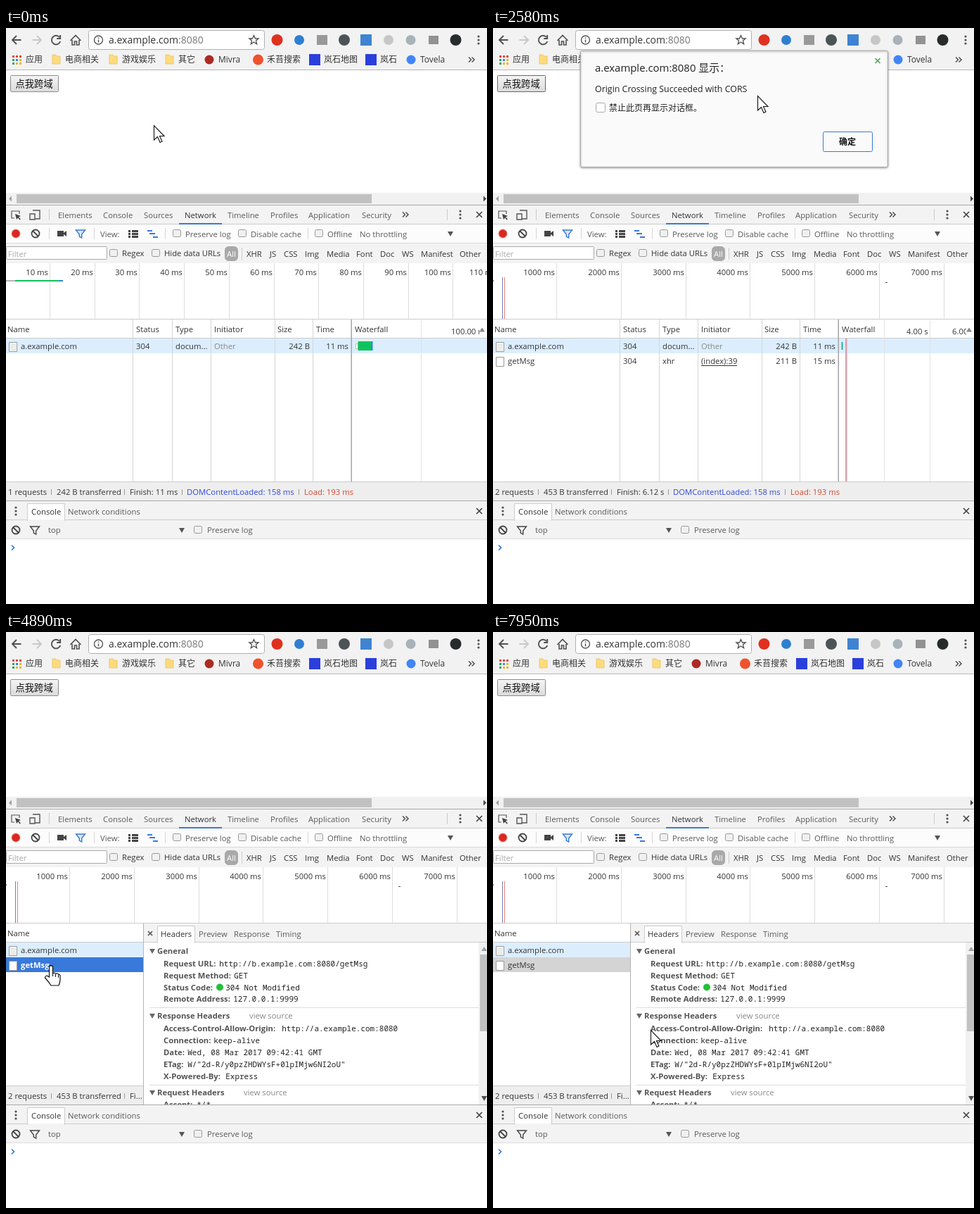
An HTML page with a canvas for the animation above (8000 ms loop, 684x818 px).

```html
<!DOCTYPE html>
<html lang="zh">
<head>
<meta charset="utf-8">
<style>
html, body { margin: 0; width: 100%; height: 100%; overflow: hidden; background: #fff; }
canvas { display: block; }
</style>
</head>
<body>
<canvas id="stage" width="684" height="818"></canvas>
<script>
const g = document.getElementById('stage').getContext('2d');
const LOOP = 8000;
const SANS = '"Open Sans","Noto Sans CJK SC","Noto Sans CJK JP",sans-serif';
const MONO = '"Noto Sans Mono","DejaVu Sans Mono",monospace';
const INK = '#333', SOFT = '#5a5a5a', DIM = '#888', BLUE = '#3879d9', BAR = '#f3f3f3', EDGE = '#ccc';

// Moments at which the page changes, in ms
const AT = { hover: 900, pending: 1140, alert: 1280, done: 1340, closed: 3200,
  rowHover: 4000, detail: 4450, arrow: 5210, drag: 5850, clear: 7180 };

// Pointer path: time, x, y
const POINTER = [
  [0, 210, 138], [230, 210, 138], [970, 44, 80], [1590, 44, 80], [2400, 344, 96], [2580, 376, 96],
  [2680, 376, 96], [3020, 523, 169], [3500, 523, 169], [3760, 96, 414], [4140, 46, 477],
  [4830, 46, 477], [4890, 63, 474], [5020, 172, 470], [5160, 172, 470], [5530, 225, 468],
  [5790, 225, 468], [5970, 313, 467], [6610, 505, 472], [6680, 508, 472], [6750, 516, 472],
  [7200, 516, 472], [7750, 236, 576], [7950, 224, 565], [8000, 224, 565]];

function rect(x, y, w, h, color) {
  g.fillStyle = color;
  g.fillRect(x, y, w, h);
}
function frame(x, y, w, h, fill, edge, r = 0) {
  g.beginPath();
  g.roundRect(x + .5, y + .5, w - 1, h - 1, r);
  g.fillStyle = fill;
  g.fill();
  g.lineWidth = 1;
  g.strokeStyle = edge;
  g.stroke();
}
function dot(x, y, r, color) {
  g.beginPath();
  g.arc(x, y, r, 0, 7);
  g.fillStyle = color;
  g.fill();
}
function shape(d, x, y, stroke, width = 1.5, fill) {
  const p = new Path2D(d);
  g.save();
  g.translate(x, y);
  if (fill) { g.fillStyle = fill; g.fill(p); }
  if (stroke) { g.strokeStyle = stroke; g.lineWidth = width; g.stroke(p); }
  g.restore();
}
function text(s, x, y, color = INK, { size = 11.3, bold, mono, align = 'left' } = {}) {
  g.font = (bold ? 'bold ' : '') + size + 'px ' + (mono ? MONO : SANS);
  g.textAlign = align;
  g.fillStyle = color;
  g.fillText(s, x, y);
}
function clipped(x, y, w, h, draw) {
  g.save();
  g.beginPath();
  g.rect(x, y, w, h);
  g.clip();
  draw();
  g.restore();
}
// Flat list of label, x pairs on one baseline
function labels(list, y, color, style) {
  for (let i = 0; i < list.length; i += 2) text(list[i], list[i + 1], y, color, style);
}
const right = (s, x, y, color) => text(s, x, y, color, { align: 'right' });
const vline = (x, y, h, color = '#ddd') => rect(x, y, 1, h, color);
const check = (x, y) => frame(x - 6, y - 6, 12, 11, '#f0f0f0', '#999', 2);
const cross = (x, y, c = '#444', r = 4) => shape(`M${-r} ${-r}L${r} ${r}M${r} ${-r}L${-r} ${r}`, x, y, c, 1.7);
const dots = (x, y) => [-5, 0, 5].forEach(d => dot(x, y + d, 1.6, '#505050'));
const down = (x, y, c = '#555') => shape('M-4-3H4L0 4Z', x, y, null, 0, c);
const up = (x, y, c) => shape('M-4 3H4L0-3Z', x, y, null, 0, c);
const more = (x, y) => shape('M-4-3.5L-.5 0-4 3.5M.5-3.5L4 0 .5 3.5', x, y, '#444', 1.4);
const funnel = (x, y, c, fill) => shape('M-6.5-5H6.5L1.7 1V6L-1.7 4V1Z', x, y, c, 1.4, fill);
const block = (x, y) => shape('M5.5 0A5.5 5.5 0 1 1-5.5 0 5.5 5.5 0 1 1 5.5 0M-4-4L4 4', x, y, '#444', 1.8);
const fileIcon = (y, lined) => {
  frame(4, y, 12, 14, '#fff', '#999');
  if (lined) for (let i = 3; i < 12; i += 2) rect(6, y + i, 8, 1, '#d5dbd5');
};

function browserBar() {
  rect(0, 0, 684, 59, '#f2f2f2');
  rect(0, 59, 684, 1, '#b8b8b8');
  const arrow = 'M6.5 0H-6M0-6L-6 0 0 6';
  shape(arrow, 15, 17, '#505050', 1.9);
  g.save();
  g.scale(-1, 1);
  shape(arrow, -44, 17, '#c8c8c8', 1.9);
  g.restore();
  shape('M5-4A6.3 6.3 0 1 0 6.2 2M6.2-7V-2H1.2', 71, 17, '#505050', 1.9);
  shape('M-7.5 1L0-6.5 7.5 1M-5 0V7H-1.5V2H1.5V7H5V0', 99, 17, '#505050', 1.6);
  frame(117, 3, 251, 28, '#fff', '#b0b0b0', 3);
  shape('M6 0A6 6 0 1 1-6 0 6 6 0 1 1 6 0M0-3.5V-2M0-.5V3.5', 131.5, 17, '#555', 1.4);
  text('a.example.com', 146, 22, INK, { size: 14 });
  text(':8080', 245, 22, '#777', { size: 14 });
  shape('M0-6.5L2-2 6.6-2 3 1 4.2 5.8 0 3-4.2 5.8-3 1-6.6-2-2-2Z', 352.5, 17, '#505050', 1.3);
  dot(385.5, 17, 8, '#e0301e');
  dot(417, 17, 7, '#2f7fd0');
  rect(442, 10, 15, 14, '#999');
  dot(481, 17, 8, '#4c5357');
  rect(504, 9, 16, 16, '#3f83d2');
  dot(544, 17, 7, '#c6c6c6');
  dot(575.5, 17, 7, '#a8b3b8');
  rect(601, 11, 14, 12, '#929292');
  dot(639.5, 17, 8, '#272b2b');
  dots(672, 17);

  const tiles = ['#e0483b', '#e0483b', '#e0483b', '#36a160', '#4285e4', '#eab52b', '#36a160', '#eab52b', '#eab52b'];
  tiles.forEach((c, i) => rect(9 + i % 3 * 5, 39 + (i / 3 | 0) * 5, 3, 3, c));
  for (const x of [66, 147, 227]) shape('M0 0H5L6 2H11V13H0Z', x, 38, '#e8c15c', .8, '#ffdb7c');
  dot(289, 45, 6.5, '#ac2b22');
  dot(358.5, 45, 7.5, '#f0522d');
  rect(431, 37, 16, 16, '#2b3fdc');
  rect(511, 37, 16, 16, '#2b3fdc');
  dot(576, 45, 6.5, '#4285f4');
  labels(['应用', 28, '电商相关', 84, '游戏娱乐', 165, '其它', 245, 'Mivra', 302,
    '禾苔搜索', 371, '岚石地图', 452, '岚石', 532, 'Tovela', 589], 49, INK, { size: 12 });
  more(662, 45);
}

function page(hover) {
  rect(0, 60, 684, 174, '#fff');
  const shade = g.createLinearGradient(0, 67, 0, 90);
  shade.addColorStop(0, '#f5f5f5');
  shade.addColorStop(1, '#dcdcdc');
  frame(6, 67, 69, 24, shade, hover ? '#6a6a6a' : '#8c8c8c', 1);
  text('点我跨域', 13.5, 84, '#111', { size: 13.3 });
  rect(0, 234, 684, 17, '#f1f1f1');
  rect(15, 236, 505, 13, '#c1c1c1');
  shape('M2-4V4L-2 0Z', 6, 242.5, null, 0, '#a0a0a0');
  shape('M-2-4V4L2 0Z', 681, 242.5, null, 0, '#444');
}

function toolsBars() {
  rect(0, 251, 684, 83, BAR);
  rect(0, 251, 684, 1, '#a8a8a8');
  rect(0, 278, 684, 1, EDGE);
  rect(0, 279, 684, 26, '#fcfcfc');
  rect(0, 305, 684, 1, '#dadada');
  rect(246, 277, 61, 2, BLUE);
  shape('M5-1V-5H-6V5H-2', 14, 265, '#555', 1.2);
  shape('M-1-1L7 2 4 3.5 7 6.5 5.5 7.5 3 4.5 1 7Z', 14, 265, null, 0, '#444');
  shape('M-3-6H7V6H0M-7-1H0V7H-7Z', 41, 265, '#555', 1.4);
  vline(61, 257, 16, EDGE);
  vline(627, 257, 16, EDGE);
  labels(['Elements', 74, 'Console', 138, 'Sources', 196, 'Timeline', 315, 'Profiles', 376,
    'Application', 430, 'Security', 506], 270, SOFT);
  text('Network', 254, 270);
  more(568, 265);
  dots(646, 265);
  cross(673, 265);

  dot(14, 292, 6.7, '#f2b5b0');
  dot(14, 292, 5.7, '#d92820');
  block(42, 292);
  for (const x of [61, 125, 226, 429]) vline(x, 284, 16, '#d6d6d6');
  shape('M-6-4H3V-1L7-4V4L3 1V4H-6Z', 79, 292, null, 0, '#444');
  funnel(106, 292, BLUE, '#d9e6fa');
  for (const d of [-4, 0, 4]) {
    rect(174, 291 + d, 3, 3, '#444');
    rect(179, 291 + d, 9, 3, '#444');
  }
  rect(201, 287, 7, 2, BLUE);
  rect(204, 291, 8, 2, BLUE);
  rect(209, 296, 7, 2, BLUE);
  check(243, 292);
  check(336, 292);
  check(445, 292);
  labels(['View:', 134, 'Preserve log', 255, 'Disable cache', 348, 'Offline', 457, 'No throttling', 503], 297, SOFT);
  down(632, 292);

  frame(0, 310, 144, 19, '#fff', '#aaa', 1);
  text('Filter', 3, 325, '#aaa');
  check(153, 320);
  check(213, 320);
  labels(['Regex', 165, 'Hide data URLs', 225], 324);
  frame(311, 310, 19, 21, '#a9a9a9', '#a9a9a9', 5);
  text('All', 314, 325, '#fff');
  vline(335, 312, 17, EDGE);
  labels(['XHR', 342, 'JS', 375, 'CSS', 395, 'Img', 425, 'Media', 456, 'Font', 498, 'Doc', 532,
    'WS', 563, 'Manifest', 590, 'Other', 645], 325);
}

function overview(sent, done) {
  rect(0, 334, 684, 79, '#fff');
  const first = sent ? 90 : 62, gap = sent ? 91.8 : 63.7, unit = sent ? 1000 : 10;
  for (let i = 0; i < 11; i++) {
    const x = Math.round(first + gap * i);
    vline(x, 334, 79);
    right(unit * (i + 1) + ' ms', x - 2, 351);
  }
  if (sent) {
    rect(0, 358, 1, 2, '#777');
    vline(13, 354, 59, '#6a80c4');
    vline(16, 354, 59, '#ee8075');
    if (done) rect(558, 361, 3, 1, '#555');
  } else {
    rect(0, 358, 13, 2, '#b5b5b5');
    rect(13, 358, 62, 2, '#11c15b');
    rect(75, 358, 6, 2, '#3580e0');
  }
  rect(0, 413, 684, 1, EDGE);
}

function table(sent, done, hover) {
  rect(0, 414, 684, 231, '#fff');
  rect(0, 441, 684, 21, '#dceefe');
  if (hover) rect(0, 462, 684, 21, '#ebf2fc');
  rect(0, 440, 684, 1, EDGE);
  for (const x of [180, 236, 291, 382, 436]) vline(x, 414, 231, '#d4d4d4');
  rect(490.5, 414, 1.5, 231, '#a4a4a4');
  labels(['Name', 2, 'Status', 185, 'Type', 241, 'Initiator', 296, 'Size', 386, 'Time', 441, 'Waterfall', 496], 432);
  const ticks = sent ? [[556], [621, '4.00 s', 588], [700, '6.00 s', 653]] : [[590], [700, '100.00 ms', 633]];
  clipped(492, 414, 181, 231, () => {
    for (const [x, label, at] of ticks) {
      vline(x, 415, 230, '#e2e2e2');
      if (label) text(label, at, 435);
    }
  });
  up(677, 428.5, '#888');

  fileIcon(446, true);
  labels(['a.example.com', 21, '304', 185, 'docum...', 241], 456);
  text('Other', 296, 456, DIM);
  right('242 B', 432, 456);
  right('11 ms', 487, 456);
  if (!sent) {
    frame(497, 448, 4, 8, '#fff', '#bbb');
    rect(500.5, 445, 19, 13, '#0cc45b');
    rect(519, 445, 2.5, 13, '#2f86dd');
    return;
  }
  rect(495.5, 446, 2, 11, '#1fb0a8');
  rect(501, 441, 1, 204, '#b9a6cc');
  rect(502, 441, 1.5, 204, '#e2a0ac');
  fileIcon(467);
  labels(['getMsg', 21, 'xhr', 241, '(index):39', 296], 477);
  rect(296, 479, 51, 1, INK);
  text(done ? '304' : '(pendin...', 185, 477, done ? INK : DIM);
  right(done ? '211 B' : '0 B', 432, 477);
  right(done ? '15 ms' : 'Pending', 487, 477, done ? INK : DIM);
}

function footer(sent, done) {
  rect(0, 645, 684, 26, '#eee');
  rect(0, 644, 684, 1, EDGE);
  const dx = done ? -1 : 0;
  labels([sent ? '2 requests' : '1 requests', 3, done ? '453 B transferred' : '242 B transferred', 72,
    done ? 'Finish: 6.12 s' : 'Finish: 11 ms', 176], 663);
  for (const x of [64, 168, 250 + dx, 416 + dx]) vline(x, 655, 8, '#999');
  text('DOMContentLoaded: 158 ms', 257 + dx, 663, '#2c46dc');
  text('Load: 193 ms', 424 + dx, 663, '#d9432c');
}

function detail(focused, selectTo) {
  rect(0, 414, 684, 257, '#fff');
  rect(0, 441, 195, 21, '#dceefe');
  rect(0, 462, 195, 21, focused ? BLUE : '#d4d4d4');
  text('Name', 2, 432);
  rect(0, 440, 195, 1, EDGE);
  fileIcon(446, true);
  text('a.example.com', 21, 456);
  fileIcon(467);
  text('getMsg', 21, 477, focused ? '#fff' : INK, { bold: focused });
  rect(0, 644, 195, 27, '#eee');
  rect(0, 644, 195, 1, EDGE);
  labels(['2 requests', 3, '453 B transferred', 72, 'Fi...', 176], 663);
  vline(64, 655, 8, '#999');
  vline(168, 655, 8, '#999');

  rect(196, 414, 488, 27, BAR);
  rect(196, 440, 488, 1, EDGE);
  vline(195, 414, 257, '#b4b4b4');
  cross(205, 428, '#555', 3);
  frame(215, 417, 54, 25, '#fff', EDGE);
  rect(216, 440, 52, 2, '#fff');
  text('Headers', 220, 433);
  labels(['Preview', 274, 'Response', 324, 'Timing', 384], 433, SOFT);
  rect(204, 533, 468, 1, '#ddd');
  rect(204, 643, 468, 1, '#ddd');

  const field = (name, value, x, y, color) => {
    text(name + ':', 224, y, color || '#545454', { bold: true });
    text(value, x - .8, y, color || '#222', { mono: true, size: 11 });
  };
  const head = (name, y, x) => {
    down(208, y - 4, '#666');
    text(name, 215, y, '#545454', { bold: true });
    if (x) text('view source', x, y, DIM);
  };
  const url = color => field('Request URL', 'http://b.example.com:8080/getMsg', 304, 475, color);
  clipped(196, 441, 476, 230, () => {
    head('General', 457);
    url();
    field('Request Method', 'GET', 325, 492);
    field('Status Code', '304 Not Modified', 313, 509);
    dot(304, 504.5, 5, '#25c03a');
    field('Remote Address', '127.0.0.1:9999', 324, 525);
    head('Response Headers', 549, 346);
    field('Access-Control-Allow-Origin', 'http://a.example.com:8080', 393, 567);
    field('Connection', 'keep-alive', 296, 584);
    field('Date', 'Wed, 08 Mar 2017 09:42:41 GMT', 259, 601);
    field('ETag', 'W/"2d-R/y0pzZHDWYsF+0lpIMjw6NI2oU"', 259, 618);
    field('X-Powered-By', 'Express', 313, 635);
    head('Request Headers', 658, 338);
    field('Accept', '*/*', 272, 675);
  });
  if (selectTo > 224) {
    const mark = (x, end) => end > x && clipped(x, 462, end - x, 16, () => {
      rect(x, 462, end - x, 16, '#3390ff');
      url('#fff');
    });
    mark(224, Math.min(selectTo, 299));
    mark(303, 303 + 6.6 * Math.round((selectTo - 303) / 6.6));
  }

  rect(672, 441, 12, 230, '#f1f1f1');
  rect(674, 458, 10, 109, '#c1c1c1');
  up(680, 450, '#a0a0a0');
  down(680, 662, '#505050');
}

function drawer() {
  rect(0, 671, 684, 55, BAR);
  rect(0, 671, 684, 1, '#aaa');
  rect(0, 698, 684, 1, EDGE);
  rect(0, 725, 684, 1, '#ddd');
  rect(0, 726, 684, 92, '#fff');
  dots(14, 686);
  frame(30, 675, 54, 25, '#fff', EDGE);
  rect(31, 698, 52, 2, BAR);
  text('Console', 36, 691);
  text('Network conditions', 88, 691, SOFT);
  cross(673, 686);
  block(14, 713);
  funnel(41, 713, '#444');
  labels(['top', 60, 'Preserve log', 286], 717, SOFT);
  down(250, 713);
  check(273, 713);
  shape('M-2-3.5L1.5 0-2 3.5', 10, 738, '#2a7bde', 1.7);
}

function alertBox() {
  g.save();
  g.shadowColor = 'rgba(0,0,0,.35)';
  g.shadowBlur = 3;
  g.shadowOffsetY = 1;
  frame(124, 32, 438, 166, '#fafafa', '#aaa', 2);
  g.restore();
  text('a.example.com:8080 显示：', 145, 62, '#222', { size: 14.9 });
  cross(547, 46.5, '#57a05a', 3.5);
  text('Origin Crossing Succeeded with CORS', 145, 91, '#222', { size: 12.4 });
  frame(146, 106, 14, 14, '#fff', '#aaa', 2);
  text('禁止此页再显示对话框。', 165, 118, '#222', { size: 12 });
  frame(469, 147, 71, 29, '#fafafa', BLUE, 2);
  text('确定', 504, 166, '#111', { size: 12, bold: true, align: 'center' });
}

function pointerAt(t) {
  const i = POINTER.findIndex(k => k[0] > t);
  const [t0, x0, y0] = POINTER[i - 1], [t1, x1, y1] = POINTER[i];
  const p = (t - t0) / (t1 - t0);
  return [Math.round(x0 + (x1 - x0) * p), Math.round(y0 + (y1 - y0) * p)];
}
function pointer(x, y, hand) {
  if (hand) {
    shape('M-2.5 1Q0-1.5 2.5 1V11Q5 9 7 11.5 10 10 11 12.5 13 12 13 15V20Q13 23 11 28H0Q-3 23-8.5 17-8 12-2.5 16Z', x, y, '#111', 1.2, '#fff');
    shape('M2.5 11V15M6.5 12V16M10.5 13V17', x, y, '#111', 1);
  } else {
    shape('M.5.5V21L5.5 16.5 9 24.5 12 23 8.5 15.5H15Z', x, y, '#111', 1.1, '#fff');
  }
}

function draw(now) {
  const t = now % LOOP;
  const during = (a, b) => t >= a && t < b;
  const sent = t >= AT.pending, done = t >= AT.done;
  const [x, y] = pointerAt(t);
  browserBar();
  page(during(AT.hover, AT.closed));
  toolsBars();
  overview(sent, done);
  if (t < AT.detail) {
    table(sent, done, t >= AT.rowHover);
    footer(sent, done);
  } else {
    detail(t < AT.drag, during(AT.drag, AT.clear) ? x : 0);
  }
  drawer();
  if (during(AT.alert, AT.closed)) alertBox();
  pointer(x, y, during(AT.rowHover, AT.arrow));
  requestAnimationFrame(() => draw(performance.now()));
}
draw(0);
</script>
</body>
</html>
```
